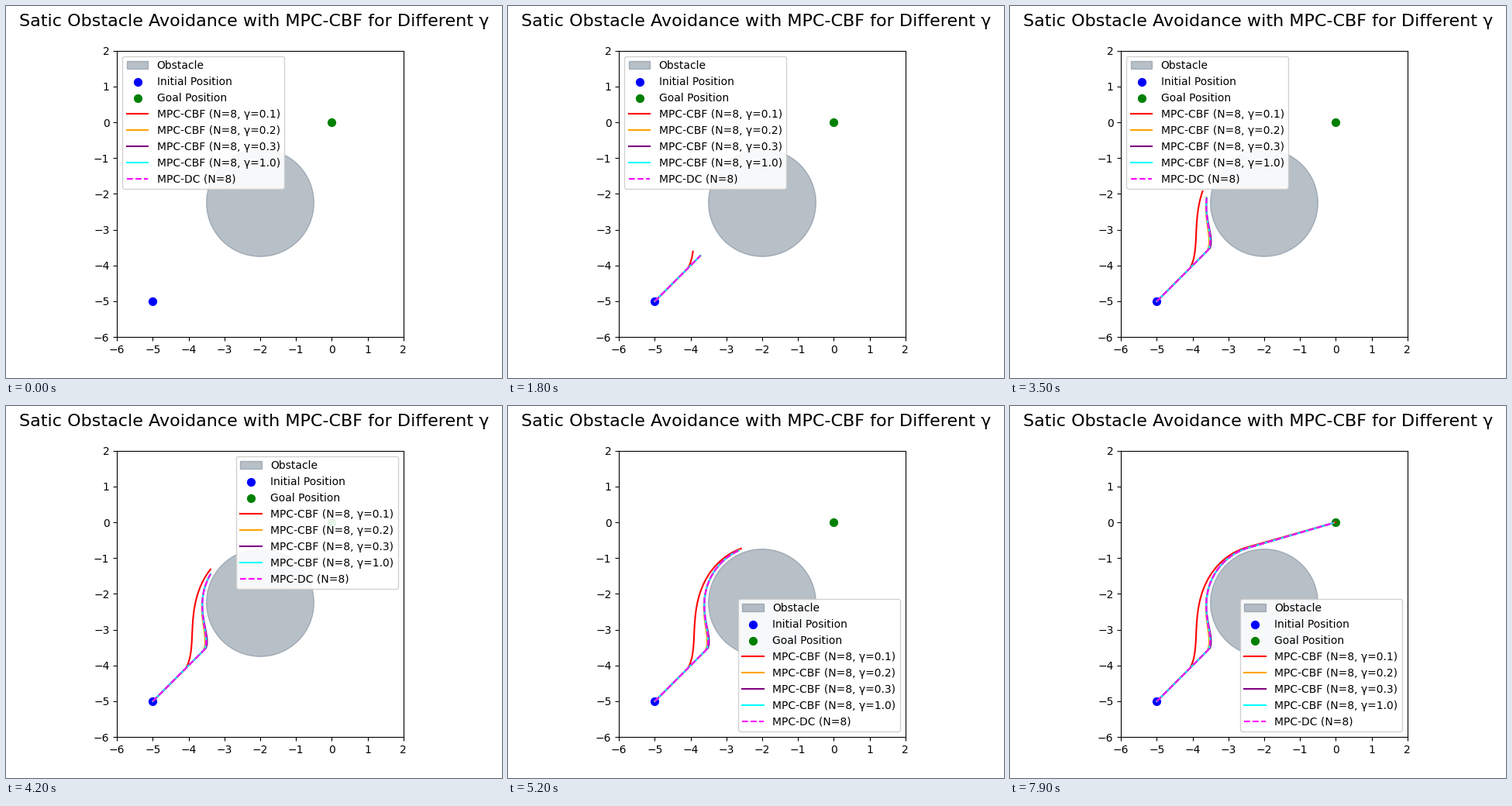
These frames come from a looping animation (640 by 480 pixels, 10 s). A matplotlib script:

```python
import numpy as np
import matplotlib.pyplot as plt
from matplotlib.animation import FuncAnimation

START, GOAL = np.array([-5.0, -5.0]), np.array([0.0, 0.0])
CENTER, RADIUS = np.array([-2.0, -2.25]), 1.5
SAFE_RADIUS = 1.6   # obstacle plus robot margin
STEP = 0.1          # distance travelled per frame
LAST_STEP = 79
FRAMES = 100
INTERVAL = 100


def barrier(position):
    offset = position - CENTER
    return offset @ offset - SAFE_RADIUS ** 2


def next_position(position, decay):
    """Head for the goal, or turn left until the barrier shrinks by at most decay."""
    to_goal = GOAL - position
    distance = np.hypot(*to_goal)
    if distance <= STEP:
        return GOAL
    direct = position + STEP * to_goal / distance
    h = barrier(position)
    if barrier(direct) >= (1 - decay) * h:
        return direct
    to_center = CENTER - position
    turn = np.arccos((decay * h + STEP ** 2) / (2 * STEP * np.hypot(*to_center)))
    heading = np.arctan2(to_center[1], to_center[0]) + turn
    return position + STEP * np.array([np.cos(heading), np.sin(heading)])


def trajectory(decay):
    path = [START]
    for _ in range(LAST_STEP):
        path.append(next_position(path[-1], decay))
    return np.array(path)


fig, ax = plt.subplots(figsize=(6.4, 4.8), dpi=100)
fig.suptitle("Satic Obstacle Avoidance with MPC-CBF for Different γ", fontsize=16)
ax.set_aspect("equal")
ax.set(xlim=(-6, 2), ylim=(-6, 2), xticks=range(-6, 3), yticks=range(-6, 3))

ax.add_patch(plt.Circle(CENTER, RADIUS, color="slategray", alpha=0.5,
                        label="Obstacle"))
ax.scatter(*START, s=50, color="blue", label="Initial Position")
ax.scatter(*GOAL, s=50, color="green", label="Goal Position")

# Effective barrier decay, colour, line style, label
RUNS = [
    (0.1, "red", "-", "MPC-CBF (N=8, γ=0.1)"),
    (0.2, "orange", "-", "MPC-CBF (N=8, γ=0.2)"),
    (0.235, "purple", "-", "MPC-CBF (N=8, γ=0.3)"),
    (0.22, "cyan", "-", "MPC-CBF (N=8, γ=1.0)"),
    (0.22, "magenta", "--", "MPC-DC (N=8)"),
]
paths = [trajectory(decay) for decay, *_ in RUNS]
lines = [ax.plot([], [], style, color=color, label=label)[0]
         for _, color, style, label in RUNS]

# The legend moves to the emptiest corner on every draw.
ax.legend(loc="best", framealpha=0.9)


def update(frame):
    count = min(frame, LAST_STEP) + 1
    for line, path in zip(lines, paths):
        line.set_data(path[:count, 0], path[:count, 1])
    return lines


anim = FuncAnimation(fig, update, frames=FRAMES, interval=INTERVAL,
                     repeat=True, repeat_delay=0, blit=False)
plt.show()
```
